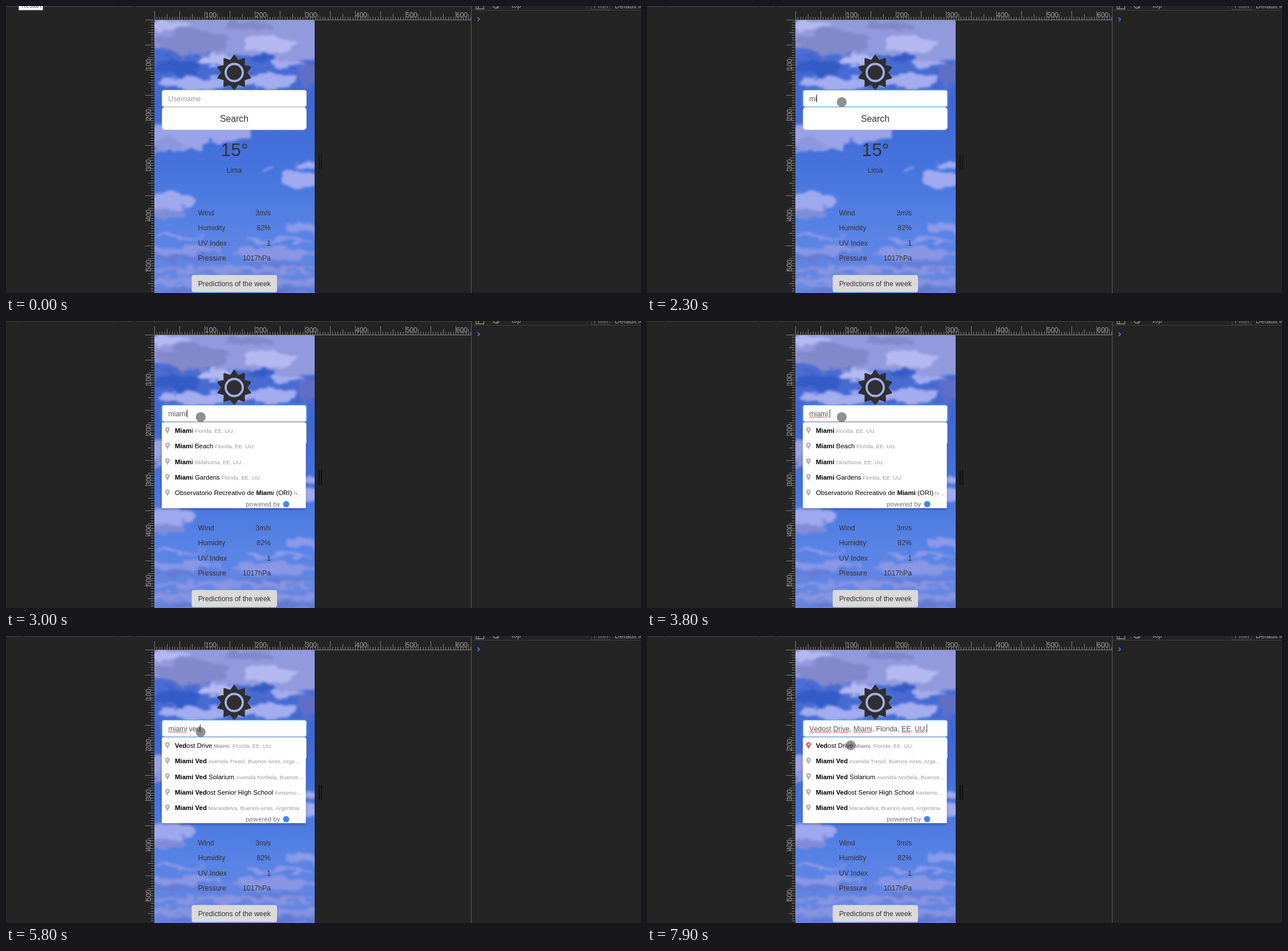
Write an HTML page that moves like this. It is 1113 by 503 pixels and loops after 8000 ms.

```html
<!DOCTYPE html>
<html lang="en">
<head>
<meta charset="utf-8">
<title>Weather search</title>
<style>
  html, body { margin: 0; width: 100%; height: 100%; overflow: hidden; background: #242424; }
  svg { display: block; font-family: "Liberation Sans", Arial, sans-serif; }
  text { white-space: pre; }
  .ui { font: 12px "Liberation Sans", Arial, sans-serif; fill: #a0a0a0; }
  .page { font-size: 12.32px; fill: #333; }
  .mid { text-anchor: middle; }
  .end { text-anchor: end; }
  .query { font-size: 11.44px; fill: #000; }
  .place { font-size: 9.68px; fill: #999; }
  .bold { font-weight: bold; }
  .powered { font: 11.8px Roboto, sans-serif; fill: #757575; }
  #typed { font-size: 12.32px; font-kerning: none; }
</style>
</head>
<body>
<svg id="stage" width="1113" height="503" viewBox="0 0 1113 503">
  <defs>
    <linearGradient id="blue" x2="0" y2="1">
      <stop offset="0" stop-color="#5570d0"/>
      <stop offset=".3" stop-color="#3f67d4"/>
      <stop offset=".55" stop-color="#4674dd"/>
      <stop offset=".75" stop-color="#5682e5"/>
      <stop offset="1" stop-color="#6a88e0"/>
    </linearGradient>
    <filter id="puff" filterUnits="userSpaceOnUse" x="220" y="0" width="360" height="540" color-interpolation-filters="sRGB">
      <feTurbulence type="fractalNoise" baseFrequency=".03 .06" numOctaves="4" seed="7"/>
      <feDisplacementMap in="SourceGraphic" scale="28" xChannelSelector="R" yChannelSelector="G"/>
      <feGaussianBlur stdDeviation="2.2"/>
    </filter>
    <filter id="shade" x="-10%" y="-10%" width="120%" height="120%">
      <feDropShadow dx="0" dy="2" stdDeviation="2.2" flood-opacity=".3"/>
    </filter>
    <filter id="halo" x="-10%" y="-60%" width="120%" height="220%">
      <feGaussianBlur stdDeviation="2.5"/>
    </filter>
    <clipPath id="screen"><rect x="260" y="25" width="281" height="478"/></clipPath>
  </defs>

  <g id="chrome">
    <path d="M0 1H30M32 1H196M198 1H224M228 1H815" stroke="#353535" stroke-width="2"/>
    <path id="ticks" fill="none" stroke="#808080"/>
    <path d="M260 24.5H815" stroke="#808080"/>
    <path d="M815.5 0V503" stroke="#5a5a5a"/>
    <path d="M816 7.5H1113" stroke="#3c3c3c"/>
    <path d="M1018.5 0V5M848.5 0V5" stroke="#3c3c3c"/>
    <path d="M824 0V5H837.5V0M828 0V5" fill="none" stroke="#8a8a8a" stroke-width="1.4"/>
    <path d="M854 0A5.2 5.2 0 0 0 864 0M860 1L863 4" fill="none" stroke="#8a8a8a" stroke-width="1.5"/>
    <path d="M1025.5 0V6.5H1058.5V0" fill="none" stroke="#444"/>
    <text class="ui" x="886" y="3">top</text>
    <text class="ui" x="1030" y="4" opacity=".7">Filter</text>
    <text class="ui" x="1067" y="4">Default levels</text>
    <path d="M826.5 20L830 23.2L826.5 26.5" fill="none" stroke="#367cf1" stroke-width="1.7"/>
    <path id="grip" d="M548.8 261V287M553 261V287" stroke="#0c0c0c"/>
  </g>
  <g id="tip">
    <rect x="22.5" y="-12" width="42" height="19" fill="#fff" stroke="#bbb"/>
    <text x="27" y="3" font-size="11" fill="#575757">Restart</text>
  </g>

  <g clip-path="url(#screen)">
    <rect x="260" y="25" width="281" height="478" fill="url(#blue)"/>
    <g id="sky" filter="url(#puff)"/>
  </g>

  <g class="page">
    <path id="sun" fill="#2f2f2f" stroke="#2f2f2f" stroke-width="3" stroke-linejoin="round"/>
    <circle cx="400" cy="116.5" r="15" fill="none" stroke="#a3aff0" stroke-width="3.8"/>
    <text class="mid" x="400.5" y="263" font-size="31.68">15°</text>
    <text class="mid" x="400" y="291.5">Lima</text>
    <g id="facts"></g>
    <rect x="325.5" y="471.5" width="149.5" height="30" rx="3.5" fill="#dadada"/>
    <text class="mid" x="400.3" y="491">Predictions of the week</text>
  </g>

  <rect id="glow" x="273" y="147" width="254" height="30" rx="4" fill="#66afe9" filter="url(#halo)"/>
  <rect x="273.5" y="147.5" width="253" height="29" rx="3.5" fill="#fff" stroke="#ccc"/>
  <rect id="focus" x="273.5" y="147.5" width="253" height="29" rx="3.5" fill="none" stroke="#66afe9"/>
  <text id="typed" x="284.5" y="167"></text>
  <path id="wavy" fill="none" stroke="#e8302a"/>
  <path id="caret" stroke="#333"/>
  <g class="page">
    <rect x="273.5" y="177.5" width="253" height="39.5" rx="5" fill="#fff" stroke="#ccc"/>
    <text class="mid" x="400" y="203" font-size="15.84">Search</text>
  </g>

  <g id="menu">
    <rect x="273" y="178" width="252.5" height="150" fill="#fff" filter="url(#shade)"/>
    <g id="rows"></g>
    <text class="powered" x="420" y="325">powered by</text>
    <circle cx="491" cy="321" r="5.5" fill="#4285f4"/>
  </g>
  <circle id="pointer" r="8.6" fill="#464646" fill-opacity=".6"/>
</svg>

<script>
const $ = id => document.getElementById(id);
const add = (parent, name, attrs, content = '') => {
  const node = document.createElementNS('http://www.w3.org/2000/svg', name);
  for (const key in attrs) node.setAttribute(key, attrs[key]);
  node.textContent = content;
  return parent.appendChild(node);
};

// Rulers: the page is shown at 88 %
const ZOOM = 0.88;
let ticks = '';
for (let u = 0; u <= 630; u += 5) {
  const size = u % 50 === 0 ? 15 : u % 25 === 0 ? 10 : 5;
  const x = Math.round(260 + u * ZOOM) + 0.5;
  const y = Math.round(24 + u * ZOOM) + 0.5;
  ticks += `M${x} 24v${-size}`;
  if (y < 503) ticks += `M259 ${y}h${-size}`;
  if (u && u % 100 === 0) {
    add($('chrome'), 'text', { class: 'ui', x: x + 0.5, y: 20 }, u);
    if (y < 503) add($('chrome'), 'text', { class: 'ui', transform: `translate(253.5 ${y}) rotate(-90)` }, u);
  }
}
$('ticks').setAttribute('d', ticks);

// Clouds: colour, then centre and radii of each puff
const clouds = [
  ['#929ade', '400 45 170 40  490 78 70 18'],
  ['#8289cb', '325 64 60 20  425 34 40 8'],
  ['#b3b9f0', '465 66 50 14  370 92 34 9  285 34 34 9'],
  ['#345cc6', '302 107 42 15  448 92 22 6'],
  ['#a3acee', '330 136 62 13  455 130 54 14  495 102 32 9'],
  ['#5f6fc6', '530 122 18 16'],
  ['#98a3e8', '300 228 60 28  385 222 46 17'],
  ['#8b96dd', '285 244 32 9'],
  ['#9faaf0', '514 306 38 14  532 277 24 8  458 283 12 3'],
  ['#9ea8ee', '288 344 40 18'],
  ['#7f8cd8', '284 364 36 9'],
  ['#8a99ea', '525 388 32 8  300 404 46 4  480 410 60 4'],
  ['#8996e4', '310 428 64 8  470 434 80 7'],
  ['#667ad2', '320 443 70 4  480 456 66 4'],
  ['#8794e0', '390 463 150 5  310 482 60 6  500 484 50 6'],
  ['#6577cd', '400 499 150 5']
];
for (const [fill, puffs] of clouds) {
  for (const puff of puffs.split('  ')) {
    const [cx, cy, rx, ry] = puff.split(' ');
    add($('sky'), 'ellipse', { cx, cy, rx, ry, fill });
  }
}

const star = [...Array(20).keys()].map(i => {
  const a = i * Math.PI / 10, r = i % 2 ? 21 : 29.5;
  return `${400 + r * Math.sin(a)} ${116.5 - r * Math.cos(a)}`;
});
$('sun').setAttribute('d', `M${star.join('L')}Z`);

[['Wind', '3m/s'], ['Humidity', '82%'], ['UV Index', '1'], ['Pressure', '1017hPa']].forEach(([name, value], i) => {
  const y = 367 + i * 26.3;
  add($('facts'), 'text', { x: 336.5, y }, name);
  add($('facts'), 'text', { x: 464, y, class: 'end' }, value);
});

// Suggestions: "name|place", with *bold* parts
const miami = n => [
  'Miami|Florida, EE. UU.',
  'Miami Beach|Florida, EE. UU.',
  'Miami|Oklahoma, EE. UU.',
  'Miami Gardens|Florida, EE. UU.',
  'Observatorio Recreativo de Miami (ORI)|N…'
].map(row => row.replace('Miami', `*${'Miami'.slice(0, n)}*${'Miami'.slice(n)}`));

const lists = {
  m: [
    'Eje Oriente Ramiro Valdenar|*M*Z47 LT20, Pa…',
    '*M*IR-26|Lantoral Parkway 58, Ashok Nagar, Jaw…',
    '*M*Q84|Quandels Parkway, Big Pine Key, Florida, …',
    'Boulevard Xobulnes|*M*z.62, Lt.4, Zona Hoteler…',
    '*m*aharastra|Vale Fisk Road, Adarsh Nagar, And…'
  ],
  mi: miami(2),
  mia: miami(3),
  miam: miami(4),
  miami: miami(5),
  ve: [
    '*Ve*dost Drive|*Miami*, Florida, EE. UU.',
    '*Miami Ve*rpical Center|Kestemore 46th Avenu…',
    '*Miami Ve*dost Senior High School|Kestemo…',
    '*Miami Ve*d Hotel|Lornethal 3rd Avenue, Miami,…',
    '*ve*sni DUNO|Nerib Way, *Miami*, Florida, EE. UU.'
  ],
  ved: [
    '*Ved*ost Drive|*Miami*, Florida, EE. UU.',
    '*Miami Ved*|Avenida Tresol, Buenos Aires, Arge…',
    '*Miami Ved* Solarium|Avenida Norbela, Buenos…',
    '*Miami Ved*ost Senior High School|Kestemo…',
    '*Miami Ved*|Marandelva, Buenos Aires, Argentina'
  ]
};

function drawRows(list, picked) {
  $('rows').replaceChildren();
  lists[list].forEach((row, i) => {
    const y = 196 + i * 27.3;
    add($('rows'), 'path', {
      d: `M283 ${y + 2.5}C282 ${y - 2} 279 ${y - 3} 279 ${y - 6}a4 4 0 0 1 8 0C287 ${y - 3} 284 ${y - 2} 283 ${y + 2.5}Z`,
      fill: picked && i === 0 ? '#f4524d' : '#b3b3b3'
    });
    add($('rows'), 'circle', { cx: 283, cy: y - 6, r: 1.4, fill: '#fff' });
    const line = add($('rows'), 'text', { x: 296, y });
    row.split('|').forEach((part, p) => {
      part.split('*').forEach((piece, b) => {
        if (!piece) return;
        const span = add(line, 'tspan', { class: (p ? 'place' : 'query') + (b % 2 ? ' bold' : '') }, piece);
        if (p && span.previousSibling.classList.contains('query')) span.setAttribute('dx', 2.6);
      });
    });
  });
}

// Each step changes only what it names; suggestions trail the typing
const steps = [
  [0, { text: '', tip: 1, caret: 0, focus: 0, at: null, list: '', marks: null, picked: 0 }],
  [400, { tip: 0.65 }],
  [500, { tip: 0.3 }],
  [600, { tip: 0 }],
  [800, { at: [328.8, 161.8] }],
  [900, { at: [341.3, 168.3] }],
  [1300, { focus: 0.6, caret: 1 }],
  [1400, { focus: 1 }],
  [1700, { caret: 0 }],
  [2100, { text: 'm', caret: 1 }],
  [2300, { text: 'mi' }],
  [2400, { list: 'm' }],
  [2500, { text: 'mia' }],
  [2600, { list: 'mi' }],
  [2700, { text: 'miam', list: 'mia' }],
  [3000, { text: 'miami', list: 'miam' }],
  [3200, { list: 'miami' }],
  [3400, { caret: 0 }],
  [3800, { text: 'miami ', caret: 1, marks: /miami/g }],
  [4400, { text: 'miami v' }],
  [4600, { text: 'miami ve' }],
  [4900, { text: 'miami ved', list: 've' }],
  [5100, { list: 'ved' }],
  [5300, { caret: 0 }],
  [5800, { caret: 1 }],
  [6300, { caret: 0 }],
  [6600, { text: 'Vedost Drive, Miami, Florida, EE. UU.', caret: 1, picked: 1, marks: /Vedost|Drive|Miami|EE|UU/g }],
  [7000, { caret: 0 }],
  [7500, { caret: 1 }]
];
for (let i = 1; i <= 5; i++) {
  const k = (1 - Math.cos(Math.PI * i / 5)) / 2;
  steps.push([7400 + i * 100, { at: [341.3 + 15.7 * k, 168.3 + 23.2 * k] }]);
}

function zigzag(from, to) {
  let d = `M${from} 169.5`;
  for (let x = from + 2, up = true; x <= to; x += 2, up = !up) d += `L${x} ${up ? 167.8 : 169.5}`;
  return d;
}

function draw(s) {
  const typed = $('typed');
  typed.textContent = s.text || 'Username';
  typed.setAttribute('fill', s.text ? '#555' : '#999');

  const words = s.marks ? [...s.text.matchAll(s.marks)] : [];
  $('wavy').setAttribute('d', words.map(w => zigzag(
    typed.getStartPositionOfChar(w.index).x,
    typed.getEndPositionOfChar(w.index + w[0].length - 1).x
  )).join(''));

  const end = s.text ? typed.getEndPositionOfChar(s.text.length - 1).x : 284;
  $('caret').setAttribute('d', `M${Math.floor(end) + 0.5} 155V169`);
  $('caret').style.opacity = s.caret;
  $('focus').style.opacity = s.focus;
  $('glow').style.opacity = s.focus * 0.6;
  $('tip').style.opacity = s.tip;
  $('grip').setAttribute('stroke-width', s.list ? 1.7 : 1);
  $('menu').style.display = s.list ? '' : 'none';
  if (s.list) drawRows(s.list, s.picked);
  $('pointer').style.display = s.at ? '' : 'none';
  if (s.at) $('pointer').setAttribute('transform', `translate(${s.at})`);
}

let shown = 0;
const start = performance.now();
function tick() {
  const t = (performance.now() - start) % 8000;
  const past = steps.filter(step => step[0] <= t);
  if (past.length !== shown) {
    shown = past.length;
    draw(Object.assign({}, ...past.map(step => step[1])));
  }
  requestAnimationFrame(tick);
}
tick();
</script>
</body>
</html>
```
